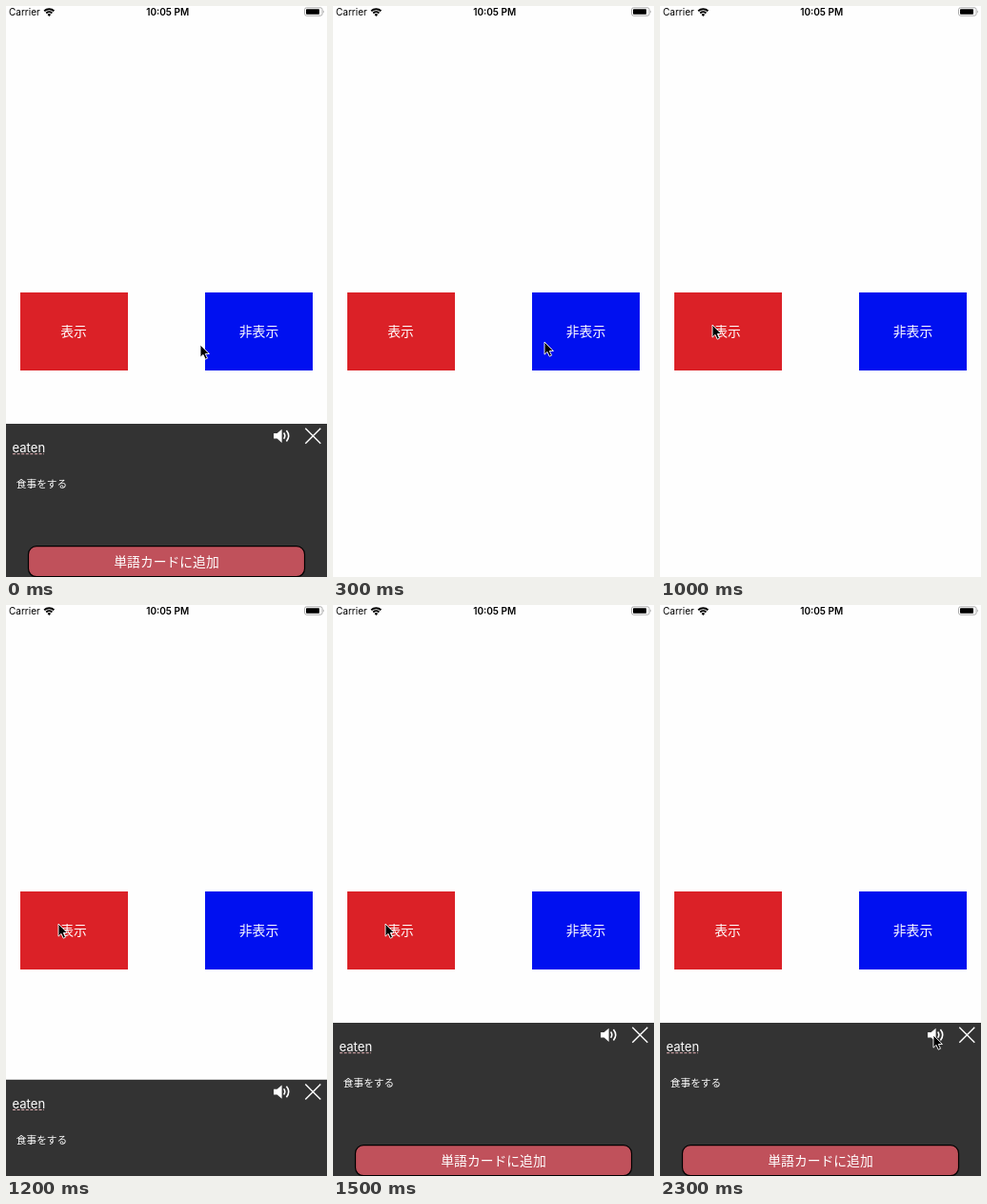
An HTML page that plays this animation: 337 by 600 pixels, repeating every 2.4 s.

```html
<!DOCTYPE html>
<html lang="ja">
<head>
<meta charset="utf-8">
<style>
html, body { margin: 0; height: 100%; overflow: hidden; background: #fefefe; }
svg { display: block; width: 100vw; height: 100vh; }
text { font-family: Inter, "Noto Sans CJK JP", "Noto Sans CJK", sans-serif; }
.jp { font-family: "Noto Sans CJK JP", "Noto Sans CJK", sans-serif; font-size: 13.8px; font-weight: 300; fill: #fff; text-anchor: middle; }
</style>
</head>
<body>
<svg viewBox="0 0 337 600">
  <rect width="337" height="600" fill="#fefefe"/>

  <!-- status bar -->
  <g font-size="10" fill="#000">
    <text x="3" y="9.6">Carrier</text>
    <text x="169.7" y="9.6" font-weight="600" text-anchor="middle">10:05 PM</text>
  </g>
  <g fill="none" stroke="#000" stroke-width="1.9">
    <path d="M40.2 5.3a7.4 7.4 0 0 1 10.2 0M42.2 7.5a4.6 4.6 0 0 1 6.2 0"/>
    <path d="M45.3 10.9l-1.8-2a2.6 2.6 0 0 1 3.6 0z" fill="#000" stroke="none"/>
  </g>
  <rect x="313.5" y="1.8" width="18.6" height="8.4" rx="2" fill="none" stroke="#999" stroke-width=".8"/>
  <rect x="315" y="3.2" width="14" height="5.6" rx=".8"/>
  <path d="M333 4.6q1.4 1.4 0 2.8z" fill="#888"/>

  <rect x="15" y="301" width="113" height="82" fill="#db2127"/>
  <rect x="209" y="301" width="113" height="82" fill="#0010f0"/>
  <text class="jp" x="71" y="347">表示</text>
  <text class="jp" x="265.5" y="347">非表示</text>

  <g id="panel">
    <rect width="337" height="162" fill="#333"/>
    <text x="6.5" y="30.3" font-size="13.1" fill="#fff">eaten</text>
    <path d="M7 31.7h33" stroke="#e6b4b8" stroke-dasharray="3 1.6"/>
    <text class="jp" x="37.5" y="67" style="font-size:10.7px">食事をする</text>
    <path d="M281 10h3.6l5-4.3v14.2l-5-4.3H281z" fill="#fff"/>
    <path d="M291.6 9.6q2.4 3.1 0 6.2M294.4 7q4.6 5.7 0 11.4" fill="none" stroke="#fff" stroke-width="1.6"/>
    <path d="M314.3 4.8l16 16m0-16l-16 16" stroke="#fff" stroke-width="1.4"/>
    <rect x="23.5" y="128.7" width="290" height="32" rx="8.5" fill="#c0515b" stroke="#000" stroke-width="1.2"/>
    <text class="jp" x="168.5" y="149.6">単語カードに追加</text>
  </g>

  <path id="cursor" d="M0 0v13.2l3-2.8 2.2 4.8 2.3-1-2.2-4.7h4.1z" fill="#000" stroke="#fff" stroke-width=".9"/>
</svg>
<script>
const LOOP = 2400, STEP = 100, HEIGHT = 161, SLIDE = 150;
const panel = document.getElementById('panel');
const cursor = document.getElementById('cursor');

// Pointer path: time, x, y
const path = [
  [0, 204, 356], [100, 220, 353], [200, 222, 353], [500, 222, 353],
  [600, 116, 332], [700, 78, 333], [800, 60, 335], [900, 55, 335],
  [1500, 55, 335], [1700, 105, 352], [1900, 245, 420],
  [2000, 280, 447], [2100, 287, 452], [LOOP, 287, 452]
];

function ease(t, start) {
  const p = Math.min(1, Math.max(0, (t - start) / SLIDE));
  return p * p * (3 - 2 * p);
}

function pointAt(t) {
  const i = path.findIndex(k => k[0] > t);
  const [t0, x0, y0] = path[i - 1], [t1, x1, y1] = path[i];
  const p = (t - t0) / (t1 - t0);
  return [x0 + (x1 - x0) * p, y0 + (y1 - y0) * p];
}

const move = (el, x, y) => el.setAttribute('transform', `translate(${x} ${y})`);

function draw(now) {
  const t = Math.floor(now % LOOP / STEP) * STEP;
  const hidden = ease(t, 145) - ease(t, 1112);
  move(panel, 0, 439 + HEIGHT * hidden);
  move(cursor, ...pointAt(t));
}

const start = performance.now();
function tick() {
  draw(performance.now() - start);
  requestAnimationFrame(tick);
}
tick();
</script>
</body>
</html>
```
